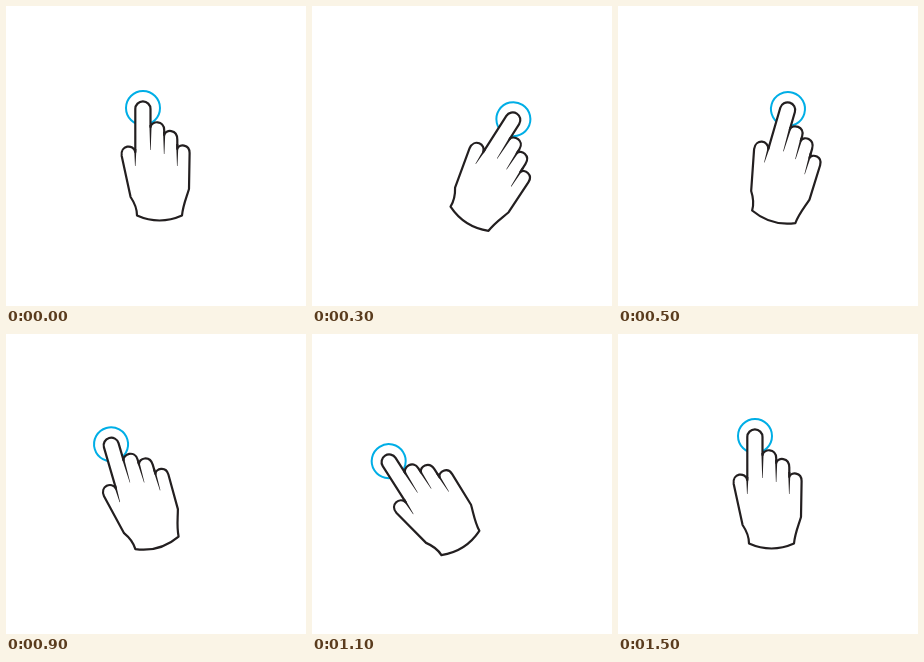
Animation, 300 px wide and 300 px high, one loop 1600 ms. Source, as an HTML page:

```html
<!DOCTYPE html>
<html lang="en">
<head>
<meta charset="utf-8">
<title>Swipe gesture</title>
<style>
  html, body { margin: 0; height: 100%; overflow: hidden; background: #fff; }
  svg { display: block; width: 100%; height: 100%; }
</style>
</head>
<body>
<svg viewBox="0 0 300 300">
  <g id="hand">
    <circle cx="137" cy="102" r="17" fill="none" stroke="#00aee6" stroke-width="2"/>
    <path fill="#fff" stroke="#231f20" stroke-width="2.2" stroke-linejoin="round"
      d="M129.3 146V103a7.6 7.6 0 0 1 15.2 0V121
         C145.5 114.5 158.2 114 158.2 124V129
         C159.5 123 171.3 123 171.3 133.5V143
         C173 137.5 183.6 138 183.6 147L183 183
         C180 193 177 199 176 209.5
         Q153.5 219.5 131 209.5
         C131 202 128 196 124.6 191
         L115.7 150C114 139 127.5 137.5 129.3 146Z"/>
    <!-- Tapering creases between the fingers -->
    <path fill="#231f20"
      d="M128.2 143h2.2l-.9 17h-.5z
         M143.4 119h2.2l-.9 25h-.5z
         M157.1 126h2.2l-.9 22h-.5z
         M170.2 138h2.2l-.9 22h-.5z"/>
  </g>
</svg>
<script>
  const hand = document.getElementById('hand');
  const tilt = 16.25;                        // degrees per step
  const poses = [0, 1, 2, 1, 0, -1, -2, -1];
  const stepTime = 200;

  function draw() {
    const step = Math.floor((performance.now() + stepTime / 2) / stepTime);
    const angle = poses[step % poses.length] * tilt;
    hand.setAttribute('transform', `rotate(${angle} 150 218)`);
    requestAnimationFrame(draw);
  }
  draw();
</script>
</body>
</html>
```
